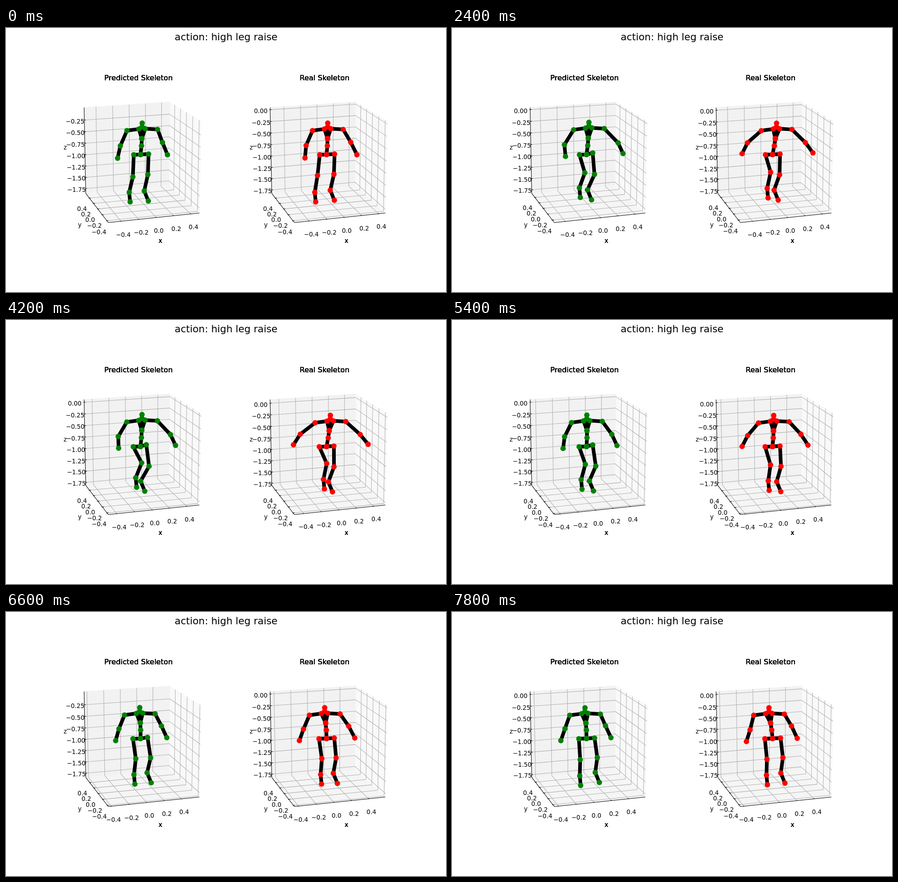
Animation, 966 px wide and 580 px high, one loop 8 s. Source, as an HTML page with a canvas:

```html
<!DOCTYPE html>
<html>
<head>
<meta charset="utf-8">
<style>
  html, body { margin: 0; width: 100%; height: 100%; overflow: hidden; background: #fff; }
  canvas { display: block; }
</style>
</head>
<body>
<canvas id="stage" width="966" height="580"></canvas>
<script>
const ctx = document.getElementById('stage').getContext('2d');
const LOOP = 8000, STEP = 600, LAST = 7800;

// Each joint: start position, drift over the loop, swing at the height of the raise.
const panels = [
  { title: 'Predicted Skeleton', color: '#008000', left: 0, armLead: .75, legLead: 1, hipSway: [-5, -3],
    joints: {
      head: [299, 209, -7, 1.5, 4, -2.5],
      elbowL: [251, 259, -3, -2.5, -3.5, -2], wristL: [245, 286, -6, -3.5, 6.5, -3],
      elbowR: [343.5, 251.5, -6.5, -1.5, 25, 1.5], wristR: [354.5, 278.5, -5.5, -2.5, 24.5, -2],
      kneeL: [278.5, 327, 3, -2.5, 18, -12], ankleL: [270.5, 361, 10, -1, 9, -14],
      kneeR: [311.5, 322, 7.5, -2, -1.5, .5], ankleR: [303.5, 358, 11, -5.5, -14, -1]
    },
    centerX: [-.02, -.018, 0, .0265, .056, .088, .075],
    centerZ: [-.92, -.903, -.893, -.88, -.88, -.906, -.875] },
  { title: 'Real Skeleton', color: '#ff0000', left: 408.4, armLead: .9, legLead: .9, hipSway: [-1.5, 0],
    joints: {
      head: [298, 209, -10.5, 1.5, 12, -.5],
      elbowL: [250.5, 258, -4.5, 1, -11, -8], wristL: [248, 285.5, -10, -1, -21, -11.5],
      elbowR: [348.5, 251, -11.5, -.5, 28.5, 1], wristR: [362, 278.5, -12.5, -1, 33, -5],
      kneeL: [275.5, 324, 7.5, -.5, 17, -9], ankleL: [269.5, 361, 12.5, -2.5, 13, -10],
      kneeR: [311.5, 321.5, 6.5, -1.5, -3.5, 2], ankleR: [303.5, 356.5, 10, -2.5, -10, .5]
    },
    centerX: [-.042, -.015, -.014, .018, .065, .075, .081],
    centerZ: [-.89, -.904, -.88, -.86, -.87, -.885, -.875] }
];

// Straight runs between key values.
const keyTimes = [0, 1200, 2400, 4200, 5400, 6600, 7800];
function along(values, t) {
  const i = Math.max(1, keyTimes.findIndex(k => k >= t));
  const u = (t - keyTimes[i - 1]) / (keyTimes[i] - keyTimes[i - 1]);
  return values[i - 1] + (values[i] - values[i - 1]) * u;
}

// Perspective camera
const AZIM = 107 * Math.PI / 180, ELEV = 16 * Math.PI / 180;
const SIN_A = Math.sin(AZIM), COS_A = -Math.cos(AZIM), SIN_E = Math.sin(ELEV), COS_E = Math.cos(ELEV);

function project([x, y, z]) {
  const near = -x * COS_A - y * SIN_A;
  const k = 1840 / (10 - near * COS_E - z * SIN_E);
  return [295.4 + k * (x * SIN_A - y * COS_A), 288.3 - k * (z * COS_E - near * SIN_E)];
}

function path(points, color, width) {
  ctx.beginPath();
  points.forEach(p => ctx.lineTo(...p));
  ctx.strokeStyle = color;
  ctx.lineWidth = width;
  ctx.stroke();
}
const line3d = (points, color) => path(points.map(project), color, 1.07);

function text(str, x, y, size, repeats = 1) {
  ctx.font = size + 'px "DejaVu Sans", sans-serif';
  ctx.fillStyle = '#000';
  while (repeats--) ctx.fillText(str, x, y);
}

function pane(corners, color) {
  ctx.beginPath();
  corners.map(project).forEach(p => ctx.lineTo(...p));
  ctx.closePath();
  ctx.fillStyle = ctx.strokeStyle = color;
  ctx.lineWidth = 1;
  ctx.fill();
  ctx.stroke();
}

// B: half the box, G: gap to the tick labels, OUT and IN: ends of a tick mark.
const SIDE = 1.0562, B = SIDE / 2 * 25 / 24, G = .0955, OUT = .0088, IN = .0176;
const axes = [
  { step: .2, digits: 1, range: 1, edge: v => [v, -B, -B],
    grid: v => [[v, -B, -B], [v, B, -B], [v, B, B]],
    tick: v => [[v, -B - OUT, -B], [v, -B + IN, -B]], label: v => [v, -B - G, -B - G] },
  { step: .2, digits: 1, range: 1, edge: v => [-B, v, -B],
    grid: v => [[-B, v, -B], [B, v, -B], [B, v, B]],
    tick: v => [[-B - OUT, v, -B], [-B + IN, v, -B]], label: v => [-B - G, v, -B - G] },
  { step: .25, digits: 2, range: 1.8, edge: v => [-B, B, v],
    grid: v => [[-B, B, v], [B, B, v], [B, -B, v]],
    tick: v => [[-B - OUT, B, v], [-B + IN, B, v]], label: v => [-B - G, B + G, v] }
];

function drawAxes(centers) {
  pane([[B, -B, -B], [B, B, -B], [B, B, B], [B, -B, B]], '#f9f9f9');
  pane([[-B, B, -B], [B, B, -B], [B, B, B], [-B, B, B]], '#f2f2f2');
  pane([[-B, -B, -B], [B, -B, -B], [B, B, -B], [-B, B, -B]], '#f5f5f5');
  const ticks = axes.map((axis, a) => {
    const list = [];
    for (let i = -8; i <= 4; i++) {
      const value = i * axis.step, offset = (value - centers[a]) / axis.range;
      if (Math.abs(offset) <= .5) list.push({ value, at: offset * SIDE });
    }
    return list;
  });
  axes.forEach((axis, a) => ticks[a].forEach(t => line3d(axis.grid(t.at), '#b0b0b0')));
  axes.forEach((axis, a) => {
    line3d([axis.edge(-B), axis.edge(B)], '#000');
    for (const t of ticks[a]) {
      line3d(axis.tick(t.at), '#000');
      const [x, y] = project(axis.label(t.at));
      text(t.value.toFixed(axis.digits).replace('-', '\u2212'), x, y + 10.3, 13.42);
    }
  });
  text('x', 339, 471.5, 13.42, 5);
  text('y', 162, 437, 13.42);
  text('z', 130, 267, 13.42);
}

const add = (p, x, y) => [p[0] + x, p[1] + y];
const mix = (p, q, t) => [p[0] + (q[0] - p[0]) * t, p[1] + (q[1] - p[1]) * t];

function drawSkeleton({ joints, color, armLead, legLead, hipSway }, u) {
  // A lead below 1 brings the peak of the raise forward.
  const raise = lead => Math.sin(Math.PI * u ** lead) ** 2;
  const joint = (name, swing) => {
    const [x, y, dx, dy, sx, sy] = joints[name];
    return [x + dx * u + sx * swing, y + dy * u + sy * swing];
  };
  const arm = name => joint(name, raise(armLead)), leg = name => joint(name, raise(legLead));

  const sway = Math.sin(Math.PI * u);
  const root = [295.3, 278], head = arm('head');
  const hipL = [280.5 - 2 * u, 278.4], hipR = [313 + hipSway[0] * sway, 276.8 + hipSway[1] * sway];
  const shoulderL = add(head, -33.5, 16.5), shoulderR = add(head, 33.8, 13.8);
  const collar = add(mix(shoulderL, shoulderR, .5), -.5, -2.6);
  const neck = mix(collar, head, .35);
  const chest = add(mix(root, collar, .62), .8, 0), spine = add(mix(root, collar, .34), 1, 0);
  const ankleL = leg('ankleL'), ankleR = leg('ankleR');

  const bones = [
    [root, spine, chest, neck, head],
    [chest, add(collar, -7, .3), shoulderL, arm('elbowL'), arm('wristL')],
    [chest, add(collar, 7, -.3), shoulderR, arm('elbowR'), arm('wristR')],
    [root, hipL, leg('kneeL'), ankleL, add(ankleL, 2, 21)],
    [root, hipR, leg('kneeR'), ankleR, add(ankleR, 9, 22)]
  ];
  bones.forEach(b => path(b, '#000', 8));
  ctx.fillStyle = color;
  for (const [x, y] of bones.flat()) {
    ctx.beginPath();
    ctx.arc(x, y, 5.9, 0, 2 * Math.PI);
    ctx.fill();
  }
}

function draw() {
  const t = Math.floor(performance.now() % LOOP / STEP) * STEP, u = t / LAST;
  ctx.fillStyle = '#fff';
  ctx.fillRect(0, 0, 966, 580);
  ctx.textAlign = 'center';
  ctx.lineJoin = 'round';
  text('action: high leg raise', 483.2, 27, 21.47);
  for (const panel of panels) {
    ctx.save();
    ctx.translate(panel.left, 0);
    text(panel.title, 291, 115, 16.1, 5);
    const centerY = .062 - .025 * Math.sin(2 * Math.PI * u);
    drawAxes([along(panel.centerX, t), centerY, along(panel.centerZ, t)]);
    drawSkeleton(panel, u);
    ctx.restore();
  }
  requestAnimationFrame(draw);
}
draw();
</script>
</body>
</html>
```
